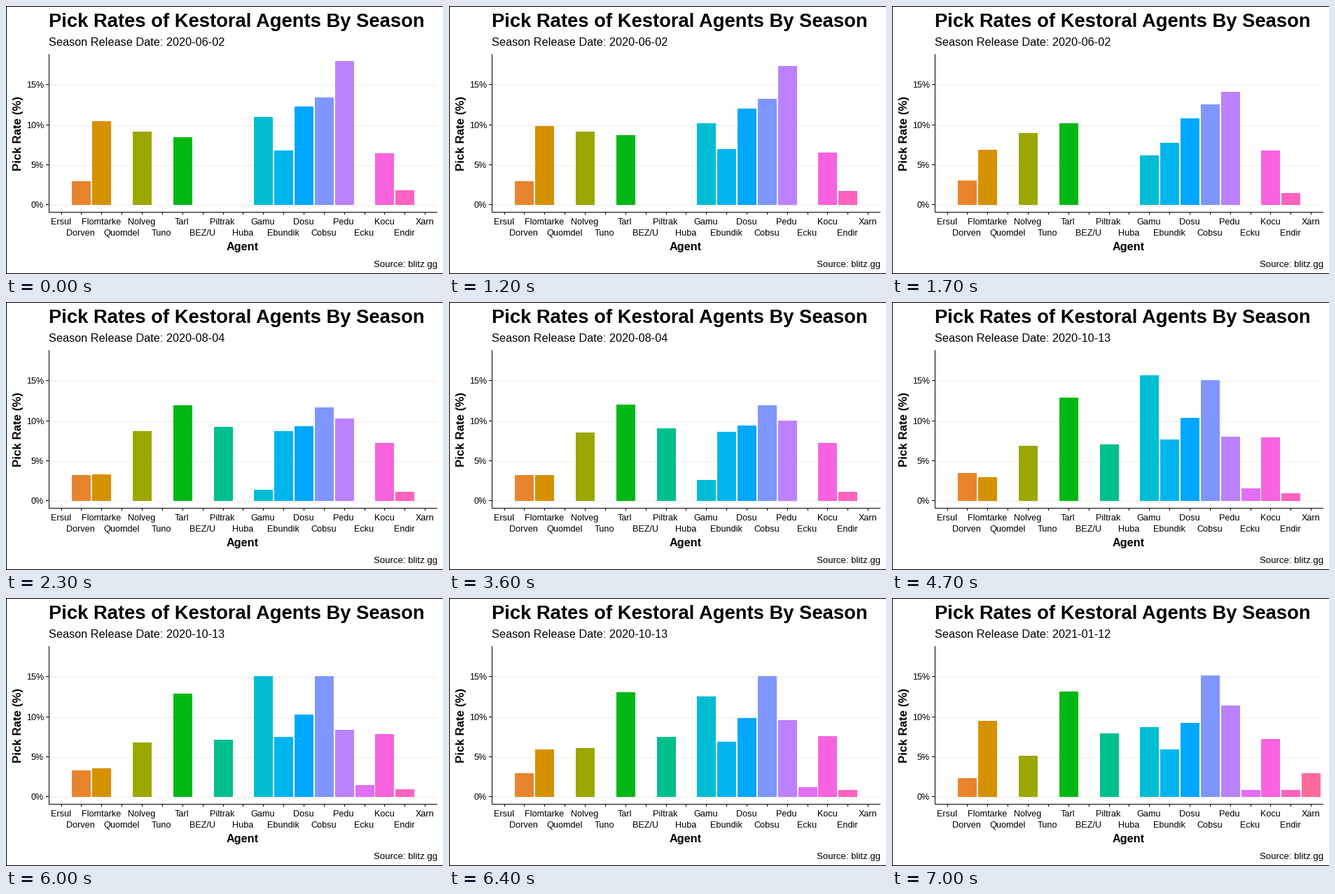
These frames come from a looping animation (624 by 384 pixels, 8000 ms). A matplotlib script:

```python
import numpy as np
import matplotlib.pyplot as plt
from matplotlib.animation import FuncAnimation
from matplotlib.patches import Rectangle

W, H, DPI = 624, 384, 100
BASE, UNIT = 284.7, 11.46            # y of 0 % and pixels per percent
X0, STEP, BAR_W = 66.05, 28.87, 27   # first slot, slot pitch, bar width

DATES = ["2020-06-02", "2020-08-04", "2020-10-13", "2021-01-12"]
SEASON = np.arange(len(DATES))
MOVES = [(12, 12), (36, 12), (60, 11)]   # first frame and length of each tween


def keys(*values, first=0, at=None):
    """Straight lines through key rates; no bar before the first one."""
    at = at or range(first, first + len(values))
    return np.interp(SEASON, at, values, left=0)


def settle(start, end, ratio):
    """Rate that closes in on its final level geometrically."""
    return end + (start - end) * ratio ** SEASON


def dip(low, bend, when):
    """Parabola with its lowest rate at the given time."""
    return low + bend * (SEASON - when) ** 2


ABSENT = np.zeros(len(DATES))
AGENTS = {
    "Ersul": ABSENT,
    "Dorven": keys(2.87, 3.38, 2.29, at=(0, 2, 3)),
    "Flomtarke": dip(2.2, 3.43, 1.546),
    "Quomdel": ABSENT,
    "Nolveg": keys(9.1, 8.65, 5.07, at=(0, 1, 3)),
    "Tuno": ABSENT,
    "Tarl": settle(8.4, 13.26, .29),
    "BEZ/U": ABSENT,
    "Piltrak": keys(9.18, 7.0, 7.87, first=1),
    "Huba": ABSENT,
    "Gamu": keys(10.93, 1.33, 15.64, 8.66),
    "Ebundik": keys(6.73, 8.66, 7.61, 5.86),
    "Dosu": keys(12.23, 9.27, 10.31, 9.18),
    "Cobsu": keys(13.38, 11.63, 15.0, 15.11),
    "Pedu": dip(7.97, 2.77, 1.895),
    "Ecku": keys(1.5, .8, first=2),
    "Kocu": keys(6.43, 7.83, 7.17, at=(0, 2, 3)),
    "Endir": settle(1.78, .8, .25),
    "Xarn": keys(2.9, first=3),
}
RATES = np.array(list(AGENTS.values())).T


def hcl(h, c=100, l=65):
    """Polar LUV colour to clipped sRGB."""
    a = np.radians(h)
    y = ((l + 16) / 116) ** 3
    u = c * np.cos(a) / (13 * l) + 0.1978398
    v = c * np.sin(a) / (13 * l) + 0.4683363
    x = 9 * y * u / (4 * v)
    z = -x / 3 - 5 * y + 3 * y / v
    lin = np.clip([3.240479 * x - 1.537150 * y - 0.498535 * z,
                   -0.969256 * x + 1.875992 * y + 0.041556 * z,
                   0.055648 * x - 0.204043 * y + 1.057311 * z], 0, 1)
    rgb = np.where(lin > 0.00304, 1.055 * lin ** (1 / 2.4) - 0.055, 12.92 * lin)
    return tuple(np.clip(rgb, 0, 1))


plt.rcParams["font.family"] = "Liberation Sans"
fig = plt.figure(figsize=(W / DPI, H / DPI), dpi=DPI, facecolor="white")
ax = fig.add_axes([0, 0, 1, 1])
ax.set_xlim(0, W)
ax.set_ylim(H, 0)
ax.axis("off")


def rect(x, y, w, h, color="black", z=3):
    return ax.add_patch(Rectangle((x, y), w, h, fc=color, lw=0,
                                  antialiased=False, zorder=z))


def label(x, y, s, px, ha="left", **kw):
    return ax.text(x, y, s, size=px * 72 / DPI, ha=ha, va="baseline",
                   color="black", **kw)


# Outer border, open on the right
rect(0, 0, W, 1)
rect(0, H - 1, W, 1)
rect(0, 0, 1, H)

# Axes, ticks and grid
rect(61, 69, 1, 227)
rect(61, 295, 555, 1)
for pct in range(0, 20, 5):
    row = int(BASE - UNIT * pct)
    ax.hlines(row + .5, 61, 616, color="#bebebe", lw=72 / DPI,
              linestyle=(0, (1, 3)), zorder=1)
    rect(57, row, 4, 1)
    label(54, row + 5.4, f"{pct}%", 12.5, "right")

bars = []
for i, name in enumerate(AGENTS):
    x = X0 + STEP * i
    rect(int(x + 13), 296, 1, 3)
    label(x + 12, 313 + 16 * (i % 2), name, 12.6, "center")
    bars.append(rect(int(x), BASE, BAR_W, 0, hcl(15 + 360 / len(AGENTS) * i), 2))

label(61, 30, "Pick Rates of Kestoral Agents By Season", 27.45, weight="bold")
subtitle = label(61, 57, "", 16.3)
label(338, 350, "Agent", 16.3, "center", weight="bold")
label(22, 182, "Pick Rate (%)", 16.9, "center", weight="bold",
      rotation=90, rotation_mode="anchor")
label(616.5, 374, "Source: blitz.gg", 13.2, "right")


def season_at(frame):
    """Current season and progress towards the next one."""
    for k, (start, length) in enumerate(MOVES):
        if frame < start + length:
            return k, max(0, frame - start + 1) / length
    return len(MOVES), 0


def draw(frame):
    k, t = season_at(frame)
    a, b = RATES[k], RATES[min(k + 1, len(MOVES))]
    rates = a + (b - a) * t
    shown = (rates > 0) & ((a > 0) | (t == 1))   # newcomers pop in at the end
    for bar, rate, on in zip(bars, rates, shown):
        top = int(BASE - UNIT * rate)
        bar.set_y(top)
        bar.set_height(285 - top)
        bar.set_visible(bool(on))
    subtitle.set_text("Season Release Date: " + DATES[k + (t > .5)])
    return [*bars, subtitle]


anim = FuncAnimation(fig, draw, frames=80, interval=100, repeat=True,
                     repeat_delay=0, blit=False)
plt.show()
```
